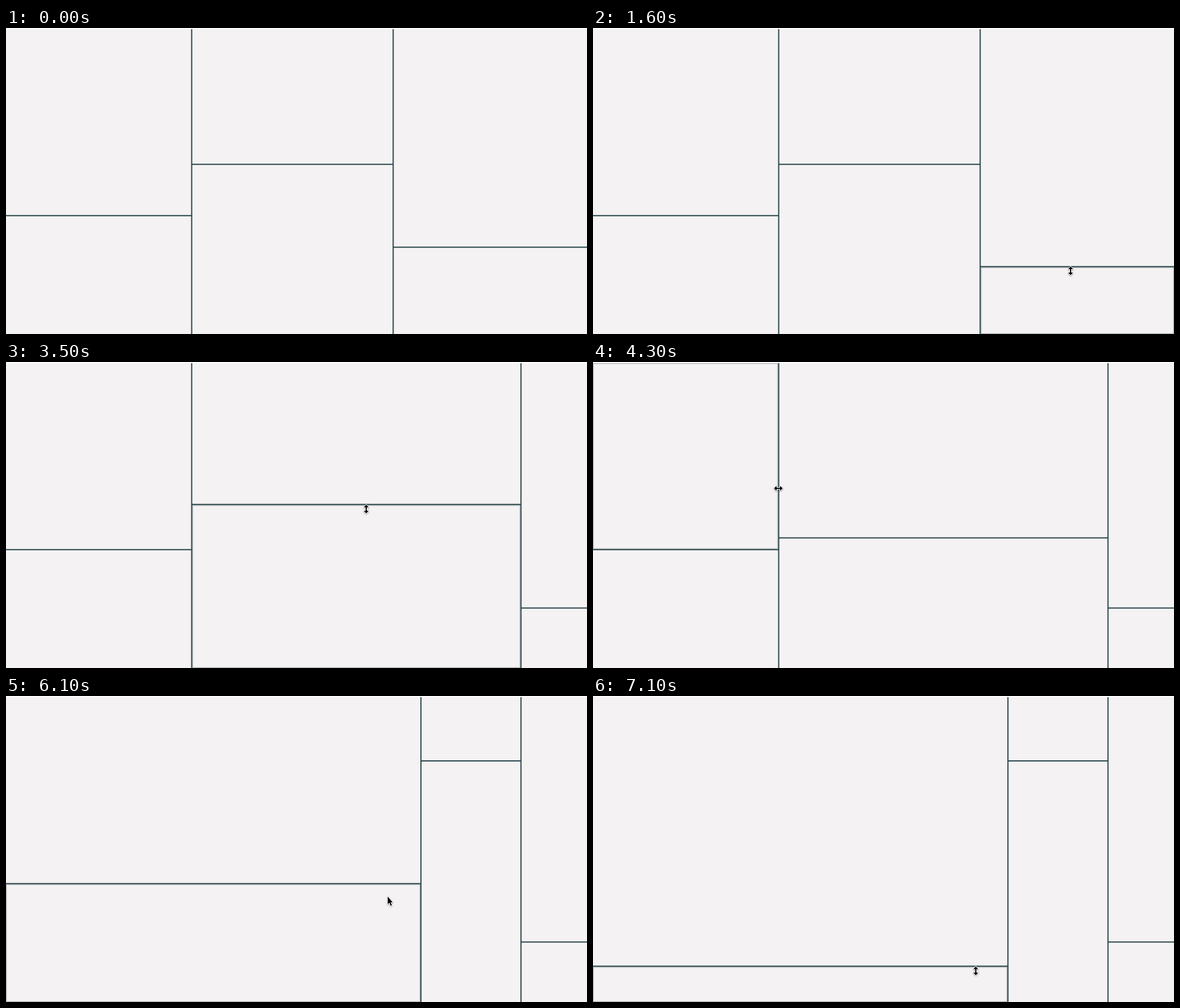
These frames come from a looping animation (1000x528 px, 7.2 s). An HTML page:

```html
<!DOCTYPE html>
<html lang="en">
<head>
<meta charset="utf-8">
<title>Resizable panels</title>
<style>
  html, body { margin: 0; width: 100%; height: 100%; overflow: hidden; background: #fff; }
  svg { display: block; width: 100vw; height: 100vh; }
  #dividers { fill: none; stroke: #29454a; stroke-width: 2; }
  #hover rect { fill: none; stroke: #2f4145; stroke-opacity: .36; }
  #hover rect + rect { stroke-opacity: .1; }
  #cursor { filter: drop-shadow(0 1px 1px rgba(0, 0, 0, .4)); }
  #cursor path { stroke: #fff; stroke-width: 1.8; stroke-linejoin: round; paint-order: stroke; }
</style>
</head>
<body>
<svg viewBox="0 0 1000 528" preserveAspectRatio="none">
  <rect y="2" width="1000" height="526" fill="#f4f2f3"/>
  <path id="dividers"/>
  <g id="hover"><rect/><rect/></g>
  <g id="cursor"><path/></g>
</svg>
<script>
const LOOP = 7200, STEP = 100, TOP = 2, WIDTH = 1000, HEIGHT = 528;
const APPEAR = 600, MOVE_TIME = 400, REACH = 6;
const X = 0, Y = 1;
const $ = id => document.getElementById(id);

// Divider positions at rest: two columns' edges, then one row edge per column.
const layout = { col1: 319.6, col2: 666.4, left: 323.8, middle: 235.2, right: 378.2 };

// The mouse moves to a point, then may drag a divider to a new position.
const gestures = [
  { move: 700, at: [822, 379], line: 'right', to: 424.6, drag: 1300, time: 458 },
  { move: 1780, at: [668, 360], line: 'col2', to: 886.4, drag: 2400, time: 280, drift: 7 },
  { move: 2800, at: [620, 237], line: 'middle', to: 303.4, drag: 3400, time: 400 },
  { move: 3800, at: [319, 218], line: 'col1', to: 714.2, drag: 4300, time: 550, drift: -204 },
  { move: 4900, at: [770, 301], line: 'middle', to: 112, drag: 5400, time: 300 },
  { move: 5700, at: [657, 346] },
  { move: 6100, at: [656, 325], line: 'left', to: 475.5, drag: 6600, time: 588, drift: 3 }
];

const icons = {
  resize: 'M0-7.5 4.2-3H1V3H4.2L0 7.5-4.2 3H-1V-3H-4.2Z',
  arrow: 'M0 0V13.2L2.9 10.6 5 15.8 7.2 14.9 5 9.9H8.5Z'
};

const clamp = u => Math.min(1, Math.max(0, u));
const smooth = u => u * u * (3 - 2 * u);

function stateAt(t) {
  const lines = { ...layout }, mouse = [835, 512];
  let dragAxis = null;
  for (const { move, at, line, to, drag, time, drift = 0 } of gestures) {
    if (t < move) break;
    const near = smooth(clamp((t - move) / MOVE_TIME));
    for (const k of [X, Y]) mouse[k] += (at[k] - mouse[k]) * near;
    if (!line || t < drag) continue;

    const axis = line.startsWith('col') ? X : Y;
    const u = clamp((t - drag) / time), distance = to - lines[line];
    // The pointer runs a little ahead of the divider it pulls.
    const lead = Math.sign(distance) * (4 + .07 * Math.abs(distance)) * Math.sin(Math.PI * u);
    lines[line] += distance * smooth(u);
    mouse[axis] += distance * smooth(u) + lead;
    mouse[1 - axis] += drift * smooth(u);
    dragAxis = u < 1 ? axis : null;
  }
  return { lines, mouse, dragAxis };
}

function setFrame(rect, [x, y, right, bottom], inset) {
  const box = { x: x + inset, y: y + inset, width: right - x - 2 * inset, height: bottom - y - 2 * inset };
  for (const name in box) rect.setAttribute(name, box[name]);
}

function draw(t) {
  const { lines, mouse, dragAxis } = stateAt(t);
  const xs = [0, lines.col1, lines.col2, WIDTH];
  const rows = [lines.left, lines.middle, lines.right];
  $('dividers').setAttribute('d',
    [1, 2].map(i => `M${xs[i]} ${TOP}V${HEIGHT}`).join('') +
    rows.map((y, i) => `M${xs[i]} ${y}H${xs[i + 1]}`).join(''));

  const active = t >= APPEAR;
  $('hover').style.display = $('cursor').style.display = active ? '' : 'none';
  if (!active) return;

  const column = (mouse[X] > xs[1]) + (mouse[X] > xs[2]);
  const row = rows[column], below = mouse[Y] > row;
  const panel = [
    xs[column] + (column > 0), below ? row + 1 : TOP,
    xs[column + 1] - (column < 2), below ? HEIGHT : row - 1
  ];
  [...$('hover').children].forEach((rect, i) => setFrame(rect, panel, i + .5));

  const isNear = (a, b) => Math.abs(a - b) < REACH;
  let axis = dragAxis;
  if (axis === null && isNear(mouse[Y], row)) axis = Y;
  if (axis === null && [xs[1], xs[2]].some(x => isNear(mouse[X], x))) axis = X;

  const icon = $('cursor').firstElementChild;
  $('cursor').setAttribute('transform', `translate(${mouse})`);
  icon.setAttribute('d', axis === null ? icons.arrow : icons.resize);
  icon.setAttribute('transform', `rotate(${axis === X ? 90 : 0})`);
}

const start = performance.now();
function tick() {
  const t = (performance.now() - start) % LOOP;
  draw(Math.floor(t / STEP) * STEP);
  requestAnimationFrame(tick);
}
tick();
</script>
</body>
</html>
```
